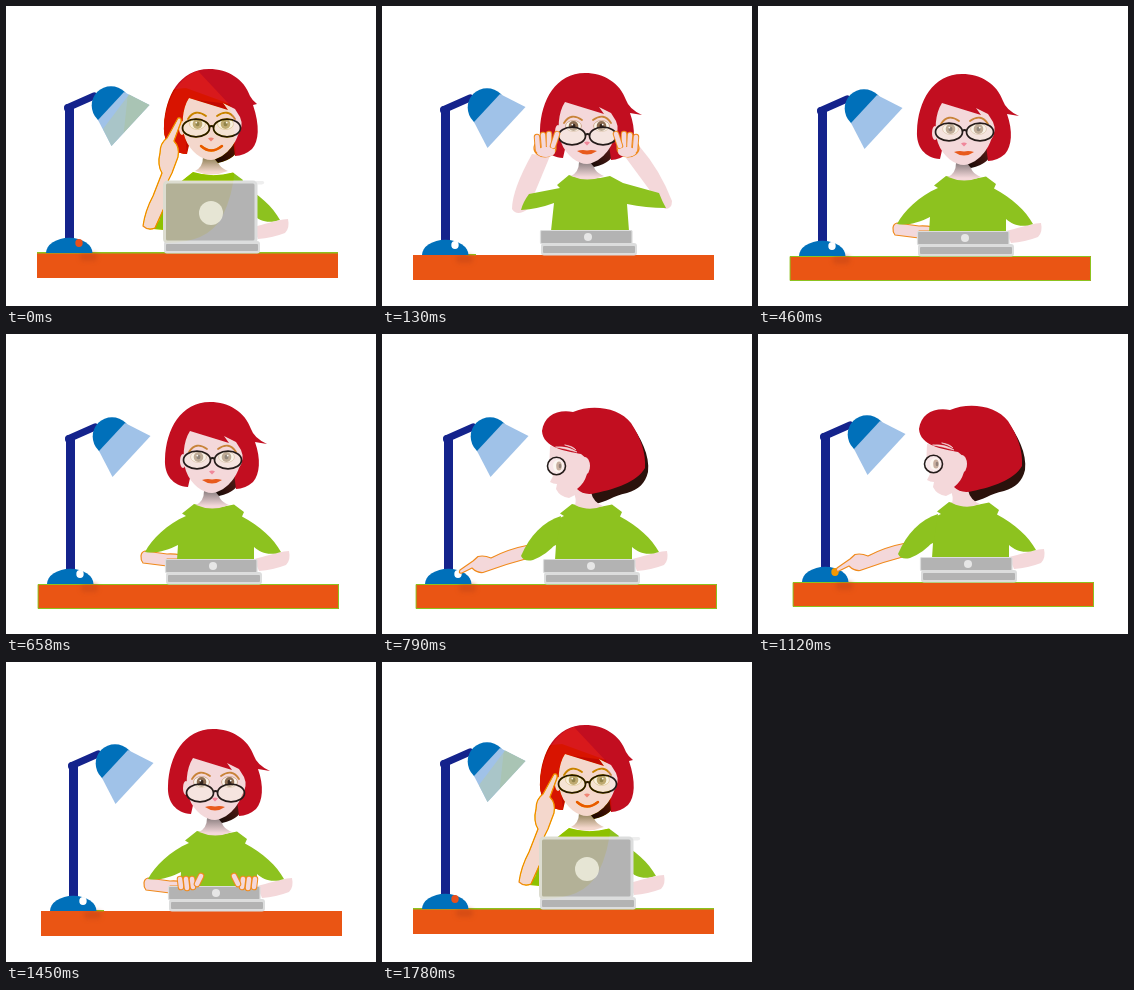
Animation, 370 px wide and 300 px high, one loop 1980 ms. Source, as an HTML page with a canvas:

```html
<!DOCTYPE html>
<html lang="en">
<head>
<meta charset="utf-8">
<title>At the desk</title>
<style>
html, body { margin: 0; width: 100%; height: 100%; overflow: hidden; background: #fff; }
canvas { display: block; }
</style>
</head>
<body>
<canvas id="stage" width="370" height="300"></canvas>
<script>
const c = document.getElementById('stage').getContext('2d');
const RED = '#c20e20', SKIN = '#f4d8da', GREEN = '#8dc21f', NAVY = '#14238c', BLUE = '#0070ba',
  PALE = '#a0c2e8', DESK = '#ea5514', GREY = '#b3b3b3', EDGE = '#dcdddd', LINE = '#f08a1c', DARK = '#2b120c';

function paint(path, fill, stroke, width = 1) {
  if (fill) { c.fillStyle = fill; c.fill(path); }
  if (stroke) { c.strokeStyle = stroke; c.lineWidth = width; c.stroke(path); }
}
const shape = (d, ...style) => paint(new Path2D(d), ...style);
function oval(x, y, rx, ry, ...style) {
  const p = new Path2D();
  p.ellipse(x, y, rx, ry, 0, 0, 7);
  paint(p, ...style);
}
function box(x, y, w, h, r, ...style) {
  const p = new Path2D();
  p.roundRect(x, y, w, h, r);
  paint(p, ...style);
}
function at(x, y, draw) {
  c.save();
  c.translate(x, y);
  draw();
  c.restore();
}
function mirror(axis, draw) {
  draw();
  c.save();
  c.translate(2 * axis, 0);
  c.scale(-1, 1);
  draw();
  c.restore();
}
function fade(x1, y1, x2, y2, from, to) {
  const g = c.createLinearGradient(x1, y1, x2, y2);
  g.addColorStop(0, from);
  g.addColorStop(1, to);
  return g;
}
function fingers(list) {
  for (const [x1, y1, x2, y2] of list) {
    const d = `M${x1} ${y1}L${x2} ${y2}`;
    shape(d, null, LINE, 6.5);
    shape(d, null, SKIN, 4.5);
  }
}

function desk(trim) {
  box(31, 249, 301, 25, 0, DESK);
  if (trim === 'all') box(31.5, 249.5, 300, 24, 0, null, GREEN, 1);
  if (trim === 'top') box(31, 248, 301, 1.5, 0, GREEN);
  if (trim === 'bit') box(84, 248, 10, 1.3, 0, GREEN);
  c.save();
  c.filter = 'blur(2px)';
  box(74, 249, 17, 8, 3, '#c9481599');
  c.restore();
}

function lamp(button, lit) {
  box(59, 103, 9, 134, 1, NAVY);
  shape('M62 103.5L88 92', null, NAVY, 7);
  oval(62, 104, 4, 4, NAVY);
  oval(105, 101.5, 19.3, 19.3, BLUE);
  shape('M118 88L143.500 101L105.500 142L92 116Z', PALE);
  if (lit) shape('M123 90.500L143.500 101L105.500 142L97 125Z', '#a9c5c8');
  shape('M40 249A23 15 0 0 1 86.500 249Z', BLUE);
  oval(73, 239, 3.7, 4, button);
}

function closedLaptop() {
  box(158.5, 224.5, 91.5, 13, 1, GREY, EDGE, 1.2);
  oval(206, 231, 4, 4, '#e6e6e6');
  box(159, 237, 96, 12.5, 3, EDGE);
  box(161, 240, 92, 7, 1, GREY);
}

function openLaptop() {
  shape('M250 177H257Q260 179 256 180.500H250Z', '#eeeeee');
  box(158.5, 178, 91.5, 60, 3, GREY, EDGE, 3);
  oval(205, 209, 12, 12, '#e6e6e0');
  box(158, 237, 96, 12.5, 3, EDGE);
  box(160, 240, 92, 7, 1, GREY);
}

function neck() {
  shape('M189 170Q197 166 197 156H212Q210 165 222 170Q205 177 189 170Z',
    fade(0, 156, 0, 171, '#8b7f80', SKIN));
}

function shirt() {
  shape('M187 169L175 178.500L179 181C160 189 145 204 138 217C149 219 161 215 171 210L170 225H247V212' +
    'C254 218 262 221 274 217C267 204 253 191 235 181.500L237 177L227 169.500Q206 175 187 169Z', GREEN);
}

function rightForearm() {
  shape('M247 224C258 222 268 217 282 216Q284 225 279 230Q266 235 252 236Z', SKIN);
}

function leftForearm() {
  shape('M138 216C133 217 133 224 136 228L160 231V224L185 224Q172 218 160 219Z', SKIN, LINE, 1.2);
}

function head(glassY, eyeY, lit) {
  shape('M219 138L235 140Q232 157 212 161L207 155Z', fade(212, 160, 232, 145, '#1c0c08', '#571b16'));
  const tail = lit ? 'Q246 98 251 102L247 103' : 'Q247 103 260 109L248 107';
  shape(`M203 67C222 67 238 77 244 94${tail}C254 124 253 139 246 147Q238 154 229 154` +
    'L226 130L186 130L181 152C166 151 157 140 158 124C159 94 174 67 203 67Z', RED);
  if (lit) shape('M192 69C174 74 160 97 158 124C157 140 166 151 181 152L178 120L183 97L223 102Z', '#d8191c');
  shape('M183 96C176 106 175 125 179 136C184 150 196 158 205 158C217 157 228 145 232 133' +
    'Q238 124 234 115L229 107L217 101L222 108Z', SKIN);
  oval(176, 126, 3, 7, SKIN);
  mirror(205.5, () => {
    shape('M182 117Q189 106 200 114', null, '#c88338', 1.8);
    oval(191.5, eyeY, 8, 5.5, '#fbf4ea', '#c9a184', 0.8);
    oval(191.5, eyeY, 4.8, 5, '#8c6d52');
    oval(191.5, eyeY, 2, 2.2, '#35251c');
    oval(190.3, eyeY - 1.4, 0.9, 0.9, '#fff');
    oval(190, glassY, 13.5, 8.8, '#f7f0e47a', '#241b19', 1.7);
  });
  shape(`M203.500 ${glassY - 1}Q205.500 ${glassY - 3} 207.500 ${glassY - 1}`, null, '#241b19', 1.7);
  shape('M202 136.500Q205 134.500 208 136.500L205 139.500Z', '#f0879a');
  if (lit) shape('M195 144Q205 153 216 144', null, '#e85a1c', 2.4);
  else shape('M195 145Q200 143.500 205 144.500Q210 143.500 215 145Q205 152 195 145Z', '#e85a1c');
}

function profile() {
  shape('M247 88C259 103 268 122 266 138C263 150 257 155 245 159C230 162 225 168 213 170L204 158Z', DARK);
  shape('M191 157Q195 165 193 171Q207 178 221 172Q211 168 209 158Z', SKIN);
  shape('M168 112L167 137L171 142L168 148Q171 150 175 150L174 155Q178 163 187 164L201 157L208 130L203 116Z', SKIN);
  shape('M160 97C162 82 175 75 191 78C209 70 237 73 249 89C259 104 264 119 263 134C255 148 233 155 214 159' +
    'Q202 162 195 155C205 147 207 137 205 125L199 120C184 117 161 114 160 97Z', RED);
  shape('M174 113Q186 112 195 118Q185 115 174 113ZM183 111Q191 112 194 116Q190 113 183 111Z', SKIN, SKIN, 0.6);
  oval(203, 132, 5, 9, SKIN);
  oval(176, 132, 5, 6, '#faf2e8');
  oval(177, 132, 2.8, 4.5, '#a47b60');
  oval(178, 132, 1.3, 2.3, '#4c3022');
  oval(174.5, 132, 9, 8.7, '#fff6', '#241b19', 1.6);
}

function reach() {
  shape('M147 211Q126 215 109 224Q102 221 96 222.500L91 227L78 236Q76 240 80 239L90 234Q95 239 101 238.500' +
    'Q124 230 147 224Z', SKIN, LINE, 1.2);
  shape('M179 182C161 188 148 201 139 222Q142 228 151 226Q166 220 175 208Z', GREEN);
}

function thinking() {
  at(0, -1, () => { shirt(); rightForearm(); });
  shape('M160 207L147 225L158 226Z', GREEN);
  at(0, -3, neck);
  at(0, -2, () => head(126, 122, true));
  shape('M172 114Q176 113 175 118L168 137Q174 143 172 153L166 169Q158 182 158 204L149 224Q142 227 137 222' +
    'Q139 207 147 192L156 169Q151 161 154 149Q154 139 161 134Z', SKIN, LINE, 1.2);
  openLaptop();
}

function adjusting() {
  shape('M150 148L168 150L146 203Q135 211 130 203Q130 184 150 148Z', SKIN);
  shape('M244 152L258 141Q278 164 290 195Q290 203 283 203L272 190Z', SKIN);
  shape('M187 169L175 179L178 182L147 188Q141 196 139 204Q156 203 172 197L169 225H247L245 198' +
    'Q264 202 284 202Q280 195 277 187L241 177L228 170Q206 176 187 169Z', GREEN);
  neck();
  head(130, 120);
  mirror(204.5, () => {
    oval(163, 142, 11, 9, SKIN, LINE, 1.2);
    fingers([[155, 131, 156, 144], [161, 129, 162, 141], [167, 128, 167, 140], [175, 128, 171, 140]]);
    oval(164, 146, 9, 5, SKIN);
  });
  closedLaptop();
}

function sitting(glassY, eyeY, typing) {
  leftForearm();
  rightForearm();
  shirt();
  neck();
  head(glassY, eyeY);
  closedLaptop();
  if (typing) mirror(207.5, () =>
    fingers([[170, 217, 171, 225], [176, 217, 177, 226], [182, 217, 183, 225], [191, 214, 187, 222]]));
}

function switching() {
  rightForearm();
  shirt();
  at(-3, -1, () => { reach(); profile(); });
  closedLaptop();
}

// Burning warms the lit shapes and leaves the white backdrop white
function beam() {
  c.globalCompositeOperation = 'color-burn';
  shape('M122 89L180 84L224 100Q238 170 216 213Q202 239 160 239L110 200Z', '#fffaba');
  c.globalCompositeOperation = 'source-over';
}

// Each pose: start time, picture shift, desk trim, button colour, figure, light on
const poses = [
  [0, 0, -2, 'top', '#e8501c', thinking, true],
  [130, 0, 0, 'bit', '#fff', adjusting],
  [460, 1, 1, 'all', '#fff', () => sitting(125, 122)],
  [790, 3, 1, 'all', '#fff', switching],
  [1120, 4, -1, 'all', '#f39800', switching],
  [1450, 4, 0, 'bit', '#fff', () => sitting(131, 120, true)],
  [1780, 0, -2, 'top', '#e8501c', thinking, true]
];
let shown;

function frame(now) {
  const pose = poses.findLast(p => p[0] <= now % 1980);
  if (pose !== shown) {
    shown = pose;
    const [, x, y, trim, button, figure, lit] = pose;
    box(0, 0, 370, 300, 0, '#fff');
    c.lineCap = c.lineJoin = 'round';
    at(x, y, () => {
      desk(trim);
      lamp(button, lit);
      figure();
      if (lit) beam();
    });
  }
  requestAnimationFrame(frame);
}
frame(0);
</script>
</body>
</html>
```
